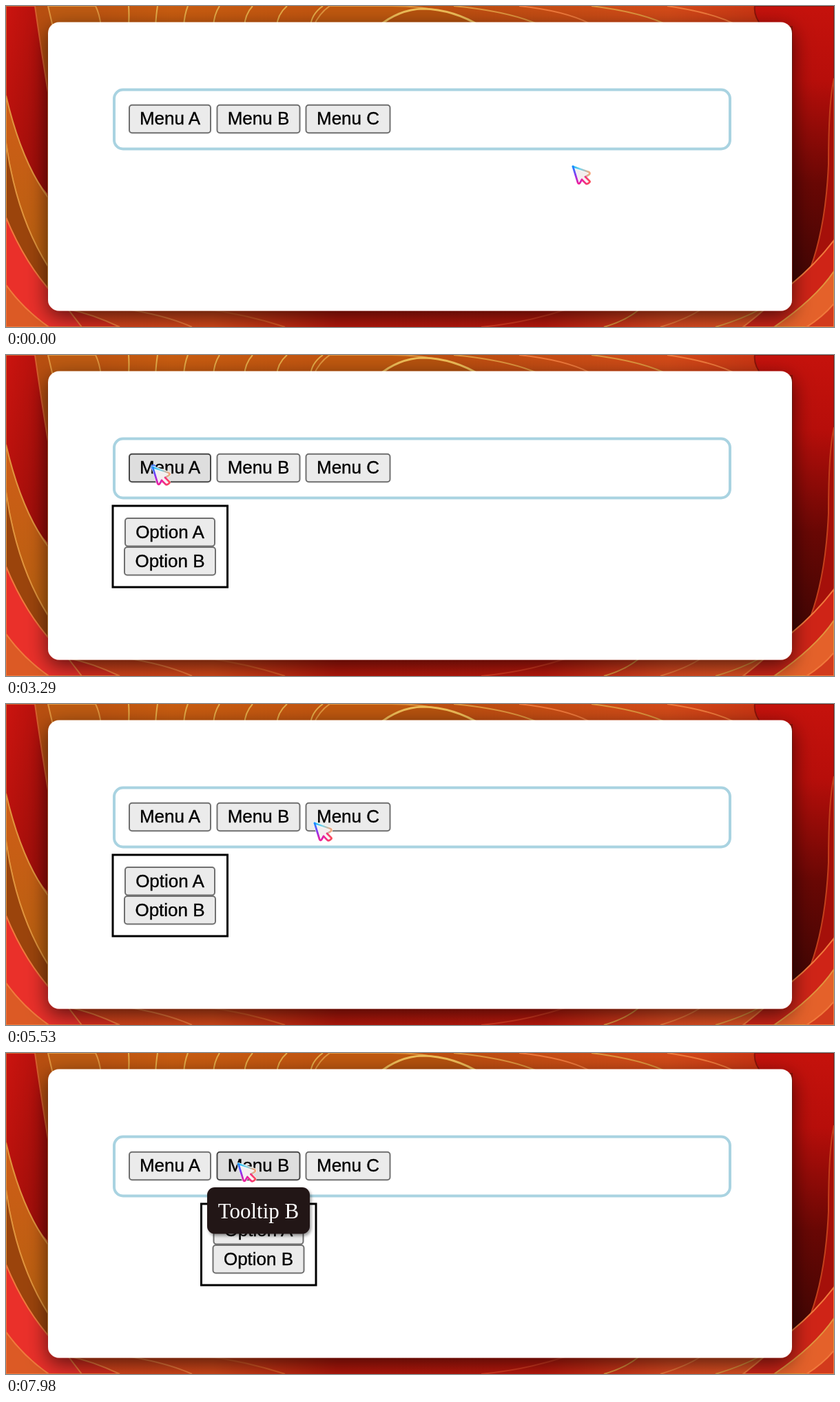
Recreate the animation shown at these times as an HTML page. Size 1202 px wide and 466 px high, loop 8 s.

```html
<!DOCTYPE html>
<html lang="en">
<head>
<meta charset="utf-8">
<title>Menu tooltips</title>
<style>
  html, body { margin: 0; width: 100%; height: 100%; overflow: hidden; }
  svg { display: block; width: 100%; height: 100%; }
  text { text-anchor: middle; }
  .label { font: 26px "Liberation Sans", Arial, sans-serif; stroke: #000; stroke-width: .35; }
  .tip { font: 31px "Liberation Serif", Times, serif; fill: #fff; }
</style>
</head>
<body>
<svg id="stage" viewBox="0 0 1202 466" preserveAspectRatio="none">
  <defs>
    <linearGradient id="top" x2="1" y2="0">
      <stop offset="0" stop-color="#b34b10"/><stop offset=".2" stop-color="#c85c10"/>
      <stop offset=".55" stop-color="#bd4e10"/><stop offset=".8" stop-color="#d34a18"/>
      <stop offset="1" stop-color="#c1240f"/>
    </linearGradient>
    <linearGradient id="bottom" x2="1" y2="0">
      <stop offset="0" stop-color="#d9401c"/><stop offset=".25" stop-color="#d44819"/>
      <stop offset=".4" stop-color="#b5170b"/><stop offset=".65" stop-color="#bd180c"/>
      <stop offset=".8" stop-color="#dd4a20"/><stop offset="1" stop-color="#e05a24"/>
    </linearGradient>
    <linearGradient id="redLeft" x2="1" y2="1">
      <stop offset="0" stop-color="#cb140f"/><stop offset="1" stop-color="#920c08"/>
    </linearGradient>
    <linearGradient id="amber" x2="0" y2="1">
      <stop offset="0" stop-color="#cf5d18"/><stop offset="1" stop-color="#b8600f"/>
    </linearGradient>
    <linearGradient id="redRight" x2="0" y2="1">
      <stop offset="0" stop-color="#c5120c"/><stop offset=".25" stop-color="#b70e0a"/>
      <stop offset=".6" stop-color="#680704"/><stop offset="1" stop-color="#3b0503"/>
    </linearGradient>
    <linearGradient id="edgeTop"><stop stop-color="#18b8f5"/><stop offset=".45" stop-color="#7fd4ea"/><stop offset="1" stop-color="#f5a67c"/></linearGradient>
    <linearGradient id="edgeLeft" x2="0" y2="1"><stop stop-color="#168cff"/><stop offset=".5" stop-color="#8a35f0"/><stop offset="1" stop-color="#f0209a"/></linearGradient>
    <linearGradient id="edgeTail" x2="1" y2="0"><stop stop-color="#f0209a"/><stop offset="1" stop-color="#fa4b5a"/></linearGradient>
    <filter id="cardShadow" x="-10%" y="-20%" width="120%" height="140%">
      <feDropShadow dx="0" dy="9" stdDeviation="15" flood-opacity=".62"/>
    </filter>
    <filter id="tipShadow" x="-10%" y="-15%" width="125%" height="140%">
      <feDropShadow dx="2" dy="3" stdDeviation="2" flood-opacity=".4"/>
    </filter>
  </defs>
  <g id="wallpaper"></g>
  <rect x="61" y="23.5" width="1080" height="419" rx="16" fill="#fff" filter="url(#cardShadow)"/>
  <rect x="157" y="121.5" width="894" height="86" rx="13" fill="#fff" stroke="#a9d3e1" stroke-width="4"/>
  <g id="menus"></g>
  <g id="popover">
    <rect x="-83" y="219" width="166.5" height="118" fill="#fff" stroke="#000" stroke-width="3"/>
  </g>
  <g id="tooltip">
    <rect x="-74.5" y="195" width="149" height="67.5" rx="11" fill="#231416" filter="url(#tipShadow)"/>
    <text class="tip" y="239.5"></text>
  </g>
  <circle id="ring" fill="none" stroke="#4878f0" stroke-width="6.5"/>
  <g id="cursor" fill="none" stroke-width="2.8" stroke-linecap="round" stroke-linejoin="round">
    <path fill="#f4eeee" stroke="#fff" stroke-width="4" d="M1 1L24 9Q27 11 24 13L19 16L25 22Q26 25 22 26L14 20L11 25Q9 27 8 24Z"/>
    <path stroke="url(#edgeTop)" d="M1 1L24 9Q27 11 24 13L19 16"/>
    <path stroke="url(#edgeLeft)" d="M1 1L8 24Q9 27 11 25L14 20"/>
    <path stroke="url(#edgeTail)" d="M14 20L20 26Q22 27 25 24Q26 23 25 22L19 16"/>
  </g>
</svg>
<script>
const LOOP = 8000, STEP = 70, RING_TIME = 400;
const byId = id => document.getElementById(id);

function add(parent, tag, attrs, text) {
  const node = document.createElementNS('http://www.w3.org/2000/svg', tag);
  for (const key in attrs) node.setAttribute(key, attrs[key]);
  if (text) node.textContent = text;
  parent.append(node);
  return node;
}

function paintWallpaper() {
  const wall = byId('wallpaper');
  const petal = (d, fill, stroke = 'none', width = 2) =>
    add(wall, 'path', { d, fill, stroke, 'stroke-width': width });
  const gold = '#e0953e', coral = '#f07a3c';

  petal('M0 0H1202V233H0Z', 'url(#top)');
  petal('M0 233H1202V466H0Z', 'url(#bottom)');

  // Top folds
  petal('M61 0H130Q136 12 138 30H68Z', '#bd5a12', gold);
  for (let i = 0; i < 7; i++) {
    const x = 178 + i * 38 + i * i;
    petal(`M${x + i * 3} 0Q${x + 1} 12 ${x} 30`, 'none', '#e6ac48');
  }
  petal('M470 0Q455 10 446 30H690Q640 0 560 0Z', '#c0580f', gold);
  petal('M540 30Q570 5 605 4Q650 5 690 30Z', '#b6520e', '#efbd58', 3);
  petal('M650 0Q735 8 780 30', 'none', gold);
  petal('M745 0Q820 8 855 30', 'none', coral);
  petal('M850 0Q925 9 965 30', 'none', gold);
  petal('M960 0Q1030 10 1065 30', 'none', coral);

  // Left folds
  petal('M0 0H42Q52 70 61 125V275Q25 235 0 140Z', 'url(#redLeft)', '#d4602c');
  petal('M0 130Q22 225 61 278V380Q15 305 0 200Z', 'url(#amber)', gold);
  petal('M0 198Q15 305 61 378V440Q22 370 0 308Z', '#9b440c', gold);
  petal('M0 307Q28 375 70 420L120 466H62Q25 440 0 405Z', '#ea302a', coral);
  petal('M0 405Q25 440 62 466H0Z', '#dc5a25', coral);

  // Bottom folds
  petal('M90 440Q125 447 165 466H110Z', '#d92c1d', coral);
  petal('M175 440Q235 450 270 466', 'none', coral);
  petal('M290 440Q350 448 405 466', 'none', '#dc5a25');
  petal('M690 466Q755 460 815 440', 'none', '#dc3a20');
  petal('M868 466Q900 457 920 440', 'none', gold);
  petal('M950 466Q987 455 1010 440', 'none', coral);
  petal('M1030 466Q1070 454 1095 440', 'none', gold);

  // Right folds
  petal('M1087 0H1202V430H1141V30H1098Q1085 15 1087 0Z', 'url(#redRight)', '#8c1408');
  petal('M1202 105Q1194 140 1194 230Q1190 320 1168 380H1202Z', '#a5100a', '#c4401c');
  petal('M1202 340Q1175 375 1141 403Q1110 435 1070 466H1202Z', '#cf2417', coral);
  petal('M1202 385Q1175 425 1115 466H1202Z', '#e4612a', gold);
  petal('M1202 432Q1185 452 1162 466H1202Z', '#d23a1c', coral);
}

function button(parent, label, cx, y, width) {
  add(parent, 'rect', {
    x: cx - width / 2, y, width, height: 40.5, rx: 4,
    fill: '#ebebeb', stroke: '#707070', 'stroke-width': 2
  });
  add(parent, 'text', { class: 'label', x: cx, y: y + 28.7 }, label);
}

const menus = [
  { name: 'A', cx: 238, width: 118 },
  { name: 'B', cx: 366.5, width: 120 },
  { name: 'C', cx: 496.5, width: 122 }
];

paintWallpaper();
for (const menu of menus) {
  menu.node = add(byId('menus'), 'g', {});
  button(menu.node, 'Menu ' + menu.name, menu.cx, 143.7, menu.width);
}
button(byId('popover'), 'Option A', 0, 237, 130);
button(byId('popover'), 'Option B', 0, 279, 132);

// Pointer stops: time, x, y
const stops = [
  [0, 822, 232], [280, 800, 226], [980, 500, 172], [1330, 488, 168],
  [1820, 378, 167], [2100, 369, 167], [2380, 362, 166], [2870, 222, 163],
  [3290, 212, 162], [3780, 214, 162], [4270, 347, 160], [5040, 354, 163],
  [5460, 430, 171], [5530, 447, 172], [5880, 476, 170], [6440, 385, 177],
  [6650, 382, 177], [6860, 355, 175], [7280, 242, 165], [7490, 240, 164],
  [7910, 332, 160], [8000, 337, 160]
];
// Tooltip spans: from, to, menu index
const tooltips = [
  [980, 1680, 2], [1750, 2590, 1], [2660, 3220, 0],
  [4130, 5390, 1], [5670, 6160, 2], [7210, 7630, 0], [7840, 8000, 1]
];
const clicks = [
  { time: 3280, x: 214, y: 163, menu: 0 },
  { time: 6580, x: 385, y: 178, menu: 1 }
];

function pointerAt(t) {
  const i = Math.max(1, stops.findIndex(stop => stop[0] >= t));
  const [t0, x0, y0] = stops[i - 1], [t1, x1, y1] = stops[i];
  const p = (t - t0) / (t1 - t0);
  const eased = p * p * (3 - 2 * p);
  return { x: x0 + (x1 - x0) * eased, y: y0 + (y1 - y0) * eased };
}

function place(id, x, y) {
  byId(id).setAttribute('transform', `translate(${x} ${y})`);
}

function show(id, visible) {
  byId(id).style.display = visible ? '' : 'none';
}

function render(t) {
  const pointer = pointerAt(t);
  place('cursor', pointer.x, pointer.y);

  // Hover follows the pointer one step late
  const hover = pointerAt(Math.max(0, t - STEP));
  for (const { cx, width, node } of menus) {
    const over = Math.abs(hover.x - cx) < width / 2 && Math.abs(hover.y - 164) < 21;
    const box = node.firstChild;
    box.setAttribute('fill', over ? '#dedede' : '#ebebeb');
    box.setAttribute('stroke', over ? '#484848' : '#707070');
  }

  const tip = tooltips.find(([from, to]) => t >= from && t < to);
  show('tooltip', tip);
  if (tip) {
    const { cx, name } = menus[tip[2]];
    place('tooltip', cx, 0);
    byId('tooltip').lastElementChild.textContent = 'Tooltip ' + name;
  }

  const click = clicks.filter(c => t >= c.time).pop();
  const progress = click ? (t - click.time) / RING_TIME : 1;
  show('popover', click);
  show('ring', progress < 1);
  if (click) place('popover', menus[click.menu].cx, 0);
  if (progress < 1) {
    place('ring', click.x, click.y);
    byId('ring').setAttribute('r', 37.5 * progress);
    byId('ring').setAttribute('opacity', 1 - progress ** 3);
  }
}

const start = performance.now();
function tick() {
  const t = Math.max(0, performance.now() - start) % LOOP;
  render(Math.floor(t / STEP) * STEP);
  requestAnimationFrame(tick);
}
tick();
</script>
</body>
</html>
```
